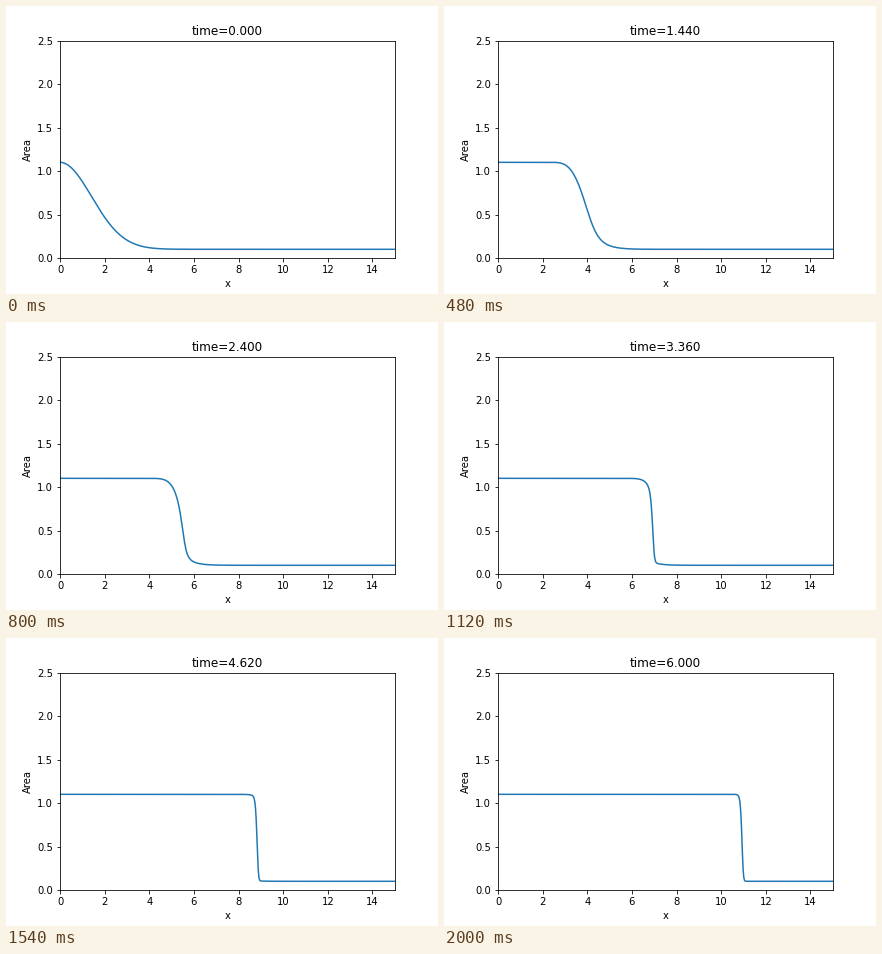
Write a matplotlib script that moves like this. It is 432 px wide and 288 px high and loops after 2020 ms.

```python
import matplotlib.pyplot as plt
import numpy as np
from matplotlib.animation import FuncAnimation

LENGTH = 15
CELLS = 500
FRAMES = 101
FRAME_DT = 0.06
SUBSTEPS = 10


def flux(area):
    """Kinematic wave discharge for a V-shaped channel."""
    return 1.4 * area ** (4 / 3)


def solve(x):
    """First-order upwind solution, one row per animation frame."""
    ratio = FRAME_DT / SUBSTEPS / (x[1] - x[0])
    area = 0.1 + np.exp(-x**2 / 4)
    rows = [area.copy()]
    for _ in range(FRAMES - 1):
        for _ in range(SUBSTEPS):
            area[1:] -= ratio * np.diff(flux(area))
        rows.append(area.copy())
    return rows


x = np.linspace(0, LENGTH, CELLS + 1)
profiles = solve(x)

plt.rcParams["font.family"] = "DejaVu Sans"
fig, ax = plt.subplots(figsize=(6, 4), dpi=72)
fig.subplots_adjust(left=0.125, right=0.9, bottom=0.125, top=0.88)
line, = ax.plot(x, profiles[0])
title = ax.set_title("time=0.000")
ax.set(xlim=(0, LENGTH), ylim=(0, 2.5), xlabel="x", ylabel="Area")


def update(i):
    line.set_ydata(profiles[i])
    title.set_text(f"time={i * FRAME_DT:.3f}")
    return line, title


anim = FuncAnimation(fig, update, frames=FRAMES, interval=20,
                     repeat=True, repeat_delay=0, blit=False)
plt.show()
```
